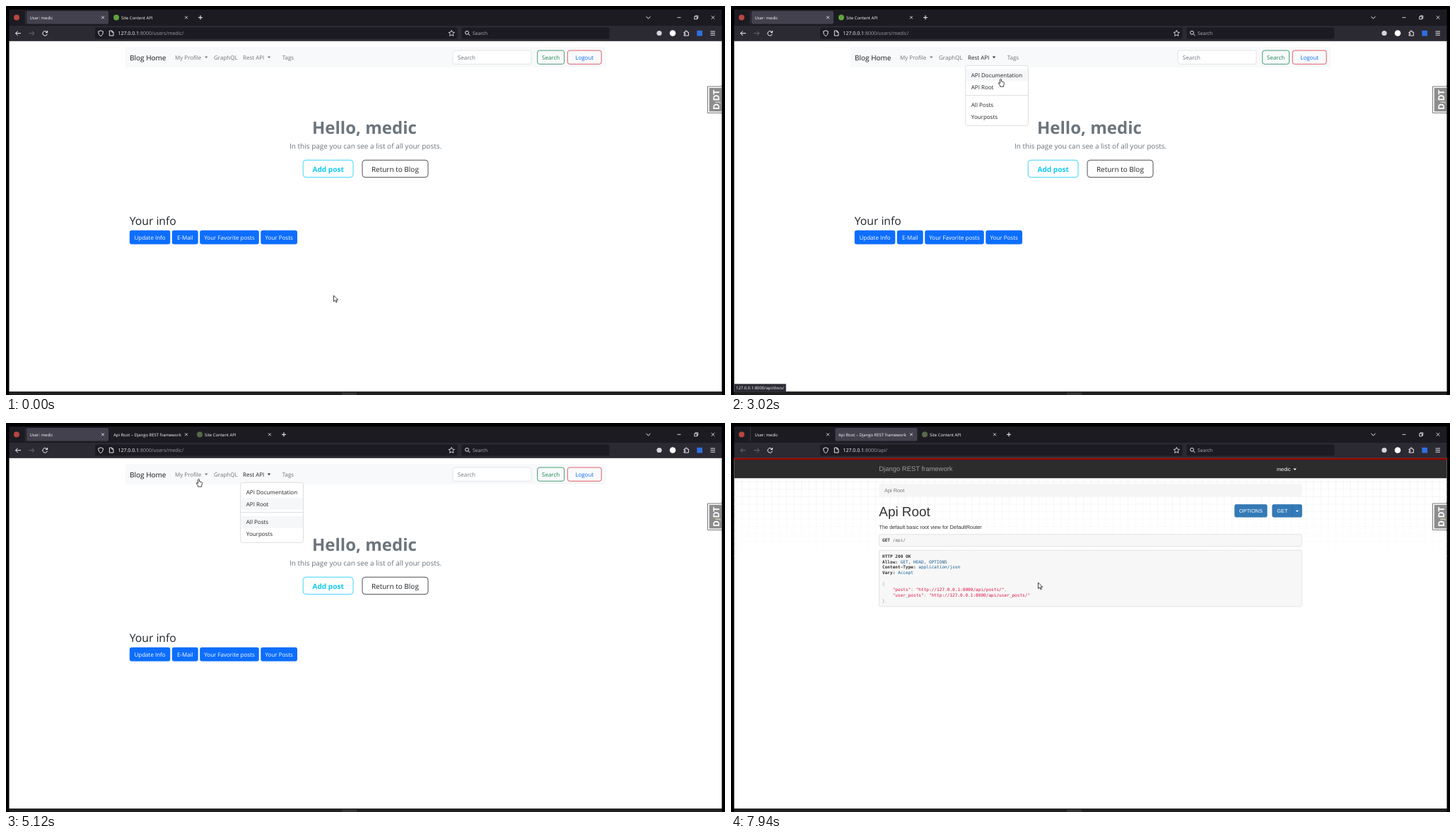
An HTML page with a canvas that plays this animation: 1017x551 px, repeating every 8000 ms.

```html
<!DOCTYPE html>
<html lang="en">
<head>
<meta charset="utf-8">
<title>Blog demo</title>
<style>
html, body { margin: 0; width: 100%; height: 100%; overflow: hidden; background: #000; }
canvas { display: block; }
</style>
</head>
<body>
<canvas id="stage" width="1017" height="551"></canvas>
<script>
const ctx = document.getElementById('stage').getContext('2d');
const LOOP = 8000;
const UI = '"Open Sans", "Noto Sans", sans-serif';
const ARIAL = '"Liberation Sans", Arial, sans-serif';
const MONO = '"DejaVu Sans Mono", monospace';
const USER = 'medic';
const API_TAB = 'Site Content API';
const INK = '#fbfbfe', DIM = '#9c9ba5', TEXT = '#212529', MUTED = '#6c757d', BLUE = '#0d6efd';

// Key times
const HOVER_STATUS = 2350, DROP_OPEN = 2420, MENU_OPEN = 3620, MENU_PICK = 4430, TAB_CLICK = 6070, PAGE_SWAP = 6200;

// Pointer moves: start, end, steps, points on the way
const moves = [
  [0, 390, 2, [[463, 410], [463, 411]]],
  [390, 460, 2, [[463, 411], [462, 410]]],
  [600, 1400, 13, [[461, 408], [430, 340], [372, 222], [328, 155], [316, 130], [322, 117], [336, 107]]],
  [1470, 2210, 10, [[349, 98], [366, 92], [377, 84], [374, 77], [366, 73]]],
  [2280, 2620, 5, [[362, 70], [358, 67], [366, 73]]],
  [2880, 3020, 3, [[370, 80], [376, 92], [381, 103]]],
  [3100, 3620, 8, [[379, 106], [372, 110], [367, 110]]],
  [3820, 4100, 5, [[374, 113], [392, 117], [405, 120]]],
  [4430, 5120, 10, [[405, 120], [372, 138], [330, 128], [296, 98], [272, 79]]],
  [5190, 5590, 7, [[280, 67], [250, 45], [215, 25], [199, 19]]],
  [6530, 6940, 7, [[215, 32], [290, 90], [385, 180], [424, 217], [435, 225]]],
  [7940, 8000, 2, [[434, 226], [434, 226]]]
];

function pointerAt(t) {
  const [start, end, steps, pts] = moves.filter(m => m[0] <= t).pop();
  const step = Math.floor((t - start) / (end - start) * (steps - 1) + 0.2);
  const u = Math.min(1, step / (steps - 1)) * (pts.length - 1);
  const i = Math.min(pts.length - 2, Math.floor(u)), f = u - i;
  return [0, 1].map(k => pts[i][k] + (pts[i + 1][k] - pts[i][k]) * f);
}

function rect(x1, y1, x2, y2, color) {
  ctx.fillStyle = color;
  ctx.fillRect(x1, y1, x2 - x1, y2 - y1);
}

function box(x1, y1, x2, y2, r, fill, stroke, width = 0.8) {
  ctx.beginPath();
  ctx.roundRect(x1, y1, x2 - x1, y2 - y1, r);
  if (fill) { ctx.fillStyle = fill; ctx.fill(); }
  if (stroke) { ctx.strokeStyle = stroke; ctx.lineWidth = width; ctx.stroke(); }
}

function disc(x, y, r, color) {
  ctx.beginPath();
  ctx.arc(x, y, r, 0, 7);
  ctx.fillStyle = color;
  ctx.fill();
}

function ring(x, y, r, from = 0, to = 7) {
  ctx.beginPath();
  ctx.arc(x, y, r, from, to);
  ctx.stroke();
}

function line(color, width, ...paths) {
  ctx.strokeStyle = color;
  ctx.lineWidth = width;
  for (const p of paths) {
    ctx.beginPath();
    for (let i = 0; i < p.length; i += 2) ctx.lineTo(p[i], p[i + 1]);
    ctx.stroke();
  }
}

function text(s, x, y, size, color, { align = 'left', weight = 400, family = UI } = {}) {
  ctx.font = `${weight} ${size}px ${family}`;
  ctx.textAlign = align;
  ctx.fillStyle = color;
  ctx.fillText(s, x, y);
  return ctx.measureText(s).width;
}

const centered = (s, x, y, size, color, opts) => text(s, x, y, size, color, { ...opts, align: 'center' });

function caret(x, y, color) {
  ctx.beginPath();
  ctx.moveTo(x - 2.3, y - 1.1);
  ctx.lineTo(x + 2.3, y - 1.1);
  ctx.lineTo(x, y + 1.3);
  ctx.fillStyle = color;
  ctx.fill();
}

function cross(x, y, r, color = INK) {
  line(color, 0.8, [x - r, y - r, x + r, y + r], [x - r, y + r, x + r, y - r]);
}

function plus(x, y) {
  line(INK, 1, [x - 3, y, x + 3, y], [x, y - 3, x, y + 3]);
}

function star(x, y, r) {
  const p = [];
  for (let i = 0; i <= 10; i++) {
    const a = i * Math.PI / 5 - Math.PI / 2, d = i % 2 ? r * 0.48 : r;
    p.push(x + d * Math.cos(a), y + d * Math.sin(a));
  }
  line(INK, 0.8, p);
}

function tabs(t, [px, py]) {
  const added = t >= MENU_PICK, second = t >= TAB_CLICK;
  rect(4.5, 5, 1012.5, 28, '#1c1b22');
  disc(15, 16.3, 4, '#b8473f');
  line('#3c3b45', 0.8, [27.5, 7, 27.5, 26]);
  if (second) box(147.5, 7, 263.5, 25.5, 2, '#42414d');
  else {
    box(29, 7, 145, 25.5, 2, '#42414d');
    if (added && py < 26 && px < 263) box(147.5, 7, 263.5, 25.5, 2, '#34333c');
  }
  text('User: ' + USER, 33.5, 18.6, 5.95, INK);
  cross(137, 16.3, 1.9);
  cross(255, 16.3, 1.9);
  if (added) {
    text('Api Root – Django REST framework', 152, 18.6, 5.95, INK);
    disc(274, 16.3, 4, '#57694c');
    text(API_TAB, 281, 18.6, 5.95, INK);
    cross(373, 16.3, 1.9);
    plus(393, 16.3);
  } else {
    disc(156, 16.3, 4, '#5fa53c');
    text(API_TAB, 163, 18.6, 5.95, INK);
    plus(275, 16.3);
  }
  line(INK, 1, [905.5, 15, 908.5, 17.8, 911.5, 15]);
  line(INK, 0.8, [949.5, 16.3, 954.5, 16.3]);
  ctx.strokeRect(973.8, 15, 3.7, 3.7);
  line(INK, 0.8, [975, 15, 975, 13.8, 978.8, 13.8, 978.8, 17.5, 977.5, 17.5]);
  cross(1000, 16.3, 2.3);
}

function toolbar(t) {
  const second = t >= TAB_CLICK;
  rect(4.5, 28, 1012.5, 49.5, '#2b2a33');
  box(126, 30.5, 638.5, 46.5, 2, '#1c1b22');
  box(644.5, 30.5, 853.5, 46.5, 2, '#1c1b22');
  line(second ? '#6b6a73' : INK, 1, [21, 38.7, 13.5, 38.7], [16.7, 35.6, 13.5, 38.7, 16.7, 41.8]);
  line('#6b6a73', 1, [32.5, 38.7, 40, 38.7], [36.8, 35.6, 40, 38.7, 36.8, 41.8]);
  line(INK, 1, [58.6, 35, 58.6, 37.6, 56, 37.6]);
  ring(55.2, 38.8, 3.2, 0.3, 5.7);

  // Shield, page and star in the address field
  ctx.lineWidth = 0.9;
  ctx.beginPath();
  ctx.moveTo(134, 34.8);
  ctx.lineTo(137.4, 36);
  ctx.quadraticCurveTo(137.6, 41, 134, 42.8);
  ctx.quadraticCurveTo(130.4, 41, 130.6, 36);
  ctx.closePath();
  ctx.stroke();
  line(INK, 0.9, [149.8, 35, 146.3, 35, 146.3, 42, 152, 42, 152, 37.2, 149.8, 35, 149.8, 37.2, 152, 37.2]);
  const w = text('127.0.0.1', 158.5, 41.2, 7, INK);
  text(second ? ':8000/api/' : `:8000/users/${USER}/`, 158.5 + w, 41.2, 7, DIM);
  star(630.2, 38.8, 4.4);

  line(INK, 0.9, [653.8, 39.6, 656.5, 42]);
  ring(652, 37.8, 2.4);
  text('Search', 660, 41.2, 6.7, '#b5b4bd');

  disc(924, 38.5, 3.6, '#d5d4dc');
  disc(943, 38.5, 4.3, '#fff');
  line(INK, 0.9, [959, 37, 961, 37, 961, 35.2, 963.2, 35.2, 963.2, 37, 965.4, 37, 965.4, 42,
    959, 42, 959, 40.4, 960.8, 40.4, 960.8, 38.6, 959, 38.6, 959, 37]);
  rect(977.3, 34.8, 985, 42.4, '#2f6fe0');
  line(INK, 0.9, [996.5, 36, 1003, 36], [996.5, 38.6, 1003, 38.6], [996.5, 41.2, 1003, 41.2]);
}

function debugHandle() {
  box(992.5, 114, 1014, 151.5, 0, '#fff', '#6c6c6c', 0.9);
  rect(994.7, 116, 1012.5, 149.5, '#8d8d8d');
  rect(1012.5, 112, 1017, 153, '#000');
  ctx.save();
  ctx.translate(1008.5, 147);
  ctx.rotate(-Math.PI / 2);
  let x = text('D', 0, 0, 12.2, '#fff', { weight: 700 });
  x += text('J', x + 0.6, 0, 8, '#cfe3c4', { weight: 700 }) + 0.8;
  text('DT', x, 0, 12.2, '#fff', { weight: 700 });
  ctx.restore();
}

function blogPage(t, pointer) {
  const link = '#737475', open = t >= DROP_OPEN;
  box(168.5, 58, 848.5, 87, 1, '#f8f9fa');
  text('Blog Home', 175, 77.2, 10, '#181818');
  text('My Profile', 239, 76, 8, link);
  caret(283.3, 72.6, link);
  text('GraphQL', 294, 76, 8, link);
  const rest = open || overRest(pointer) ? '#222' : link;
  text('Rest API', 335, 76, 8, rest);
  caret(372, 72.6, rest);
  text('Tags', 390.7, 76, 8, link);
  box(632, 63, 743, 82.3, 3, '#fff', '#dbdfe4');
  text('Search', 638.8, 76, 8, MUTED);
  box(751.7, 63, 789.6, 82.3, 3, null, '#198754');
  centered('Search', 770.6, 76, 8, '#198754');
  box(794.3, 63, 842.2, 82.3, 3, null, '#dc3545');
  centered('Logout', 818.2, 76, 8, BLUE);

  text('Hello, ' + USER, 433, 180.5, 24, MUTED, { weight: 700 });
  centered('In this page you can see a list of all your posts.', 508.6, 201.5, 10, MUTED);
  box(420.2, 218.3, 491, 242.6, 4, null, '#0dcaf0');
  centered('Add post', 455.7, 234.7, 10.1, '#0dcaf0', { weight: 700 });
  box(504, 218.3, 597, 242.6, 4, null, TEXT);
  centered('Return to Blog', 550.4, 234.7, 10, TEXT);

  text('Your info', 174.8, 310, 15.7, TEXT);
  const buttons = [['Update Info', 174.8, 232.3], ['E-Mail', 234.8, 271.7],
    ['Your Favorite posts', 274.2, 357.8], ['Your Posts', 360.3, 412]];
  for (const [label, x1, x2] of buttons) {
    box(x1, 317.8, x2, 337.5, 3, BLUE);
    centered(label, (x1 + x2) / 2, 331, 8, '#fff');
  }
  if (open) dropdown(t, pointer);
}

const rows = [['API Documentation', 89.6], ['API Root', 106.4], ['All Posts', 131.9], ['Yourposts', 148.7]];
const ROW = 16.8;
const overRest = ([x, y]) => x > 331 && x < 378 && y > 62 && y < 84;
const overProfile = ([x, y]) => x > 235 && x < 290 && y > 62 && y < 84;
const rowAt = ([x, y]) => x > 332 && x < 420 ? rows.findIndex(r => y >= r[1] && y < r[1] + ROW) : -1;

function dropdown(t, pointer) {
  box(331.7, 84.3, 420.5, 169.3, 3, '#fff', '#d5d5d5');
  const menu = t >= MENU_OPEN && t < MENU_PICK;
  const hot = menu ? 1 : t > 4650 ? 2 : rowAt(pointer);
  rows.forEach(([label, y], i) => {
    if (i === hot || (i === 1 && t >= MENU_OPEN)) rect(332.2, y, 420, y + ROW, '#f6f7f9');
    text(label, 339.8, y + 11.2, 8, TEXT);
  });
  line('#d5d5d5', 0.8, [332, 126.6, 420, 126.6]);
}

// Underscore marks the access key, '>' a submenu
const menuItems = [
  [122, 'Open Link in New _Tab'], [138, 'Open Link in Ne_w Container Tab', '>'],
  [153.6, 'Open Link in New Win_dow'], [169.4, 'Open Link in New _Private Window'],
  [187.7, '_Bookmark Link…'], [203.4, 'Save Lin_k As…'], [219.1, 'Save Link t_o Drawer'],
  [234.9, 'Copy _Link'], [250.7, 'Se_nd Link to Device', '>'],
  [269, '_Search FernFinder for “API Root”'],
  [287.4, 'Inspect Accessibility Properties'], [303.1, 'Inspect (_Q)'],
  [321.4, 'SingleFile', '>', '#3d8fd6'], [337.2, 'Block element…', '', '#a01218'], [353, 'Bitwarden', '>', '#2f6fe0']
];

function contextMenu(pointer) {
  box(368.7, 111.3, 492.3, 362.8, 1, '#2b2a33', '#55545f');
  if (pointer[1] > 112) rect(369.2, 114.2, 491.8, 130, '#52525e');
  for (const y of [178.5, 259.8, 278.2, 312.3]) line('#6a6973', 0.8, [375, y, 486, y]);
  for (const [y, label, sub, icon] of menuItems) {
    const [before, after] = label.split('_'), x = icon ? 387.5 : 375.2;
    text(before + (after || ''), x, y + 2.2, 5.95, INK);
    if (after) {
      const left = x + ctx.measureText(before).width;
      line(INK, 0.5, [left, y + 3.3, left + ctx.measureText(after[0]).width, y + 3.3]);
    }
    if (icon === '#a01218') disc(379.3, y, 3.6, icon);
    else if (icon) rect(375.7, y - 3.7, 383, y + 3.7, icon);
    if (sub) line(INK, 0.9, [480.2, y - 2.7, 483, y, 480.2, y + 2.7]);
  }
}

function statusBar(t, pointer) {
  if (t < HOVER_STATUS || t >= MENU_PICK) return;
  const row = t >= MENU_OPEN ? 1 : rowAt(pointer);
  const path = row === 0 ? 'api/docs/' : row === 1 ? 'api/' : `users/${USER}/#`;
  const url = '127.0.0.1:8000/' + path;
  ctx.font = `5.95px ${UI}`;
  const w = ctx.measureText(url).width;
  box(4.5, 535.6, 9.5 + w, 546.3, 0, '#2b2a33', '#55545f', 0.7);
  text(url, 7, 543.3, 5.95, INK);
}

function codeLine(y, ...runs) {
  let x = 214;
  for (const [s, color, weight] of runs) x += text(s, x, y, 6.1, color, { weight, family: MONO });
}

function apiPage() {
  const arial = { family: ARIAL }, dark = '#333', grey = '#93a1a1', red = '#d14', blue = '#195f91';
  const fade = ctx.createLinearGradient(0, 78, 0, 195);
  fade.addColorStop(0, '#eee');
  fade.addColorStop(1, '#fff');
  for (let x = 15.5; x < 1012; x += 10.5) line(fade, 0.7, [x, 78, x, 195]);
  for (let y = 83.5; y < 190; y += 10.5) line(fade, 0.7, [4.5, y, 1012.5, y]);

  rect(4.5, 49.5, 1012.5, 78.2, '#2c2c2c');
  rect(4.5, 49.8, 1012.5, 52, '#a30000');
  text('Django REST framework', 209.3, 68.2, 9.45, '#9d9d9d', arial);
  text(USER, 772, 67.8, 7.35, '#fff', arial);
  caret(797.6, 65.6, '#fff');

  box(209.3, 86, 807.7, 105, 2, '#f5f5f5');
  text('Api Root', 217, 98.2, 7.35, '#777', arial);
  text('Api Root', 209.3, 132.4, 18.9, dark, arial);
  box(712.5, 115.5, 758.2, 133.3, 2, '#337ab7', '#2e6da4', 0.6);
  centered('OPTIONS', 735.3, 127.1, 7.35, '#fff', arial);
  box(765.7, 115.5, 807.5, 133.3, 2, '#337ab7', '#2e6da4', 0.6);
  line('#2e6da4', 0.6, [794, 115.5, 794, 133.3]);
  centered('GET', 779.9, 127.1, 7.35, '#fff', arial);
  caret(800.8, 124.8, '#fff');
  text('The default basic root view for DefaultRouter', 209.5, 149.7, 7.35, dark, arial);

  box(209.5, 157.8, 807.5, 174.6, 2, '#f7f7f7', '#dcdcdc', 0.7);
  codeLine(168.2, ['GET', dark, 700], [' /api/', '#666', 400]);
  box(209.5, 180.3, 807.5, 260, 2, '#f7f7f7', '#dcdcdc', 0.7);
  codeLine(190.6, ['HTTP 200 OK', dark, 700]);
  codeLine(198.5, ['Allow:', dark, 700], [' GET, HEAD, OPTIONS', blue, 400]);
  codeLine(206.4, ['Content-Type:', dark, 700], [' application/json', blue, 400]);
  codeLine(214.2, ['Vary:', dark, 700], [' Accept', blue, 400]);
  codeLine(230, ['{', grey, 400]);
  codeLine(237.9, ['    "posts"', red, 400], [': ', grey, 400], ['"http://127.0.0.1:8000/api/posts/"', red, 400], [',', grey, 400]);
  codeLine(245.7, ['    "user_posts"', red, 400], [': ', grey, 400], ['"http://127.0.0.1:8000/api/user_posts/"', red, 400]);
  codeLine(253.6, ['}', grey, 400]);
}

const arrowShape = new Path2D('M0 0V8.6L2 6.8L3.4 9.8L4.8 9.2L3.5 6.3H6.2Z');
const handShape = new Path2D('M-1 1Q0 -.8 1 1V4L4 4.7Q5.2 5 5 6.5L4.2 9.3V11.2H-1V9.6L-3.2 6.8Q-3.4 5.4 -2.2 5.7L-1 6.8Z');

function drawPointer(t, pointer) {
  const menu = t >= MENU_OPEN && t < MENU_PICK;
  const onLink = overRest(pointer) || overProfile(pointer) || (t >= DROP_OPEN && rowAt(pointer) >= 0);
  const shape = t < PAGE_SWAP && !menu && onLink ? handShape : arrowShape;
  ctx.save();
  ctx.translate(pointer[0] + 0.5, pointer[1]);
  ctx.fillStyle = '#fff';
  ctx.strokeStyle = '#111';
  ctx.lineWidth = 0.8;
  ctx.fill(shape);
  ctx.stroke(shape);
  ctx.restore();
}

function draw(t) {
  const pointer = pointerAt(t);
  rect(0, 0, 1017, 551, '#000');
  rect(4.5, 49.5, 1012.5, 546.3, '#fff');
  tabs(t, pointer);
  toolbar(t);
  if (t < PAGE_SWAP) blogPage(t, pointer);
  else apiPage();
  debugHandle();
  statusBar(t, pointer);
  rect(4.5, 546.3, 1012.5, 551, '#202020');
  rect(475, 547.5, 496, 551, '#343434');
  if (t >= MENU_OPEN && t < MENU_PICK) contextMenu(pointer);
  drawPointer(t, pointer);
}

ctx.textRendering = 'geometricPrecision';
function tick() {
  draw(performance.now() % LOOP);
  requestAnimationFrame(tick);
}
tick();
</script>
</body>
</html>
```
